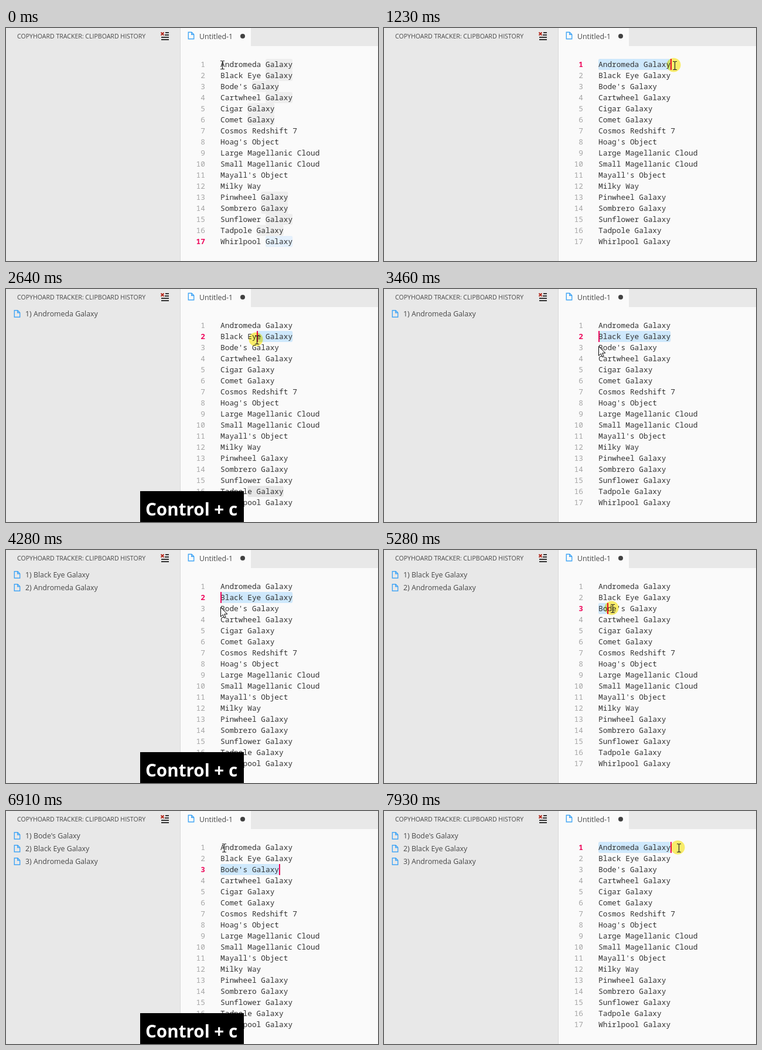
An HTML page with a canvas that plays this animation: 635x400 px, repeating every 8 s.

```html
<!DOCTYPE html>
<html lang="en">
<head>
<meta charset="utf-8">
<title>Clipboard history</title>
<style>
  html, body { margin: 0; width: 100%; height: 100%; overflow: hidden; background: #fafafa; }
  canvas { display: block; }
</style>
</head>
<body>
<canvas id="stage" width="635" height="400"></canvas>
<script>
const ctx = document.getElementById('stage').getContext('2d');

const LOOP = 8000, TICK = 203.3;
const TEXT_X = 366, CHAR = 7.7, TOP = 53, ROW = 19;
const SANS = '"Open Sans", "Noto Sans", sans-serif';
const MONO = '12.83px "Noto Sans Mono", monospace';
const PINK = '#ee0a5c', BLUE = '#42a5f5', SELECTED = '#cee8fc';

const lines = [
  'Andromeda Galaxy', 'Black Eye Galaxy', "Bode's Galaxy", 'Cartwheel Galaxy',
  'Cigar Galaxy', 'Comet Galaxy', 'Cosmos Redshift 7', "Hoag's Object",
  'Large Magellanic Cloud', 'Small Magellanic Cloud', "Mayall's Object", 'Milky Way',
  'Pinwheel Galaxy', 'Sombrero Galaxy', 'Sunflower Galaxy', 'Tadpole Galaxy', 'Whirlpool Galaxy'
];

// Each drag selects from its first column to the column reached at each tick.
const drags = [
  { start: 3, line: 0, columns: [0, 4, 11, 16] },
  { start: 11, line: 1, columns: [16, 13, 8, 4, 2, 0] },
  { start: 25, line: 2, columns: [0, 2, 6, 10, 13] },
  { start: 37, line: 0, columns: [0, 9, 16] }
];
const copies = [9, 18, 30];
const CAPTION_TICKS = 5;

// tick, x, y
const mousePath = [
  [0, 369, 63], [3, 369, 63], [4, 398, 63], [6, 496, 64], [9, 496, 64], [11, 491, 84],
  [12, 466, 85], [13, 428, 87], [14, 394, 91], [16, 366, 98], [24, 366, 98], [25, 368, 100],
  [26, 390, 100], [29, 474, 101], [30, 474, 101], [33, 372, 63], [36, 372, 63],
  [37, 368, 63], [39, 503, 63]
];

const fileIcon = new Path2D('M.8.8H6.4L10.2 4.6V12.2H.8ZM6.2 1V4.8H10');
const beam = new Path2D('M-3.5-7H-1.5Q0-7 0-5.5Q0-7 1.5-7H3.5M0-6V6M-3.5 7H-1.5Q0 7 0 5.5Q0 7 1.5 7H3.5');
const arrow = new Path2D('M.5.5V16.5L4.2 13L6.8 18.8L9.2 17.8L6.7 12H11.8Z');

function rect(x, y, w, h, color, radius = 0) {
  ctx.fillStyle = color;
  ctx.beginPath();
  ctx.roundRect(x, y, w, h, radius);
  ctx.fill();
}

function text(string, x, y, font, color, align = 'left') {
  ctx.font = font;
  ctx.fillStyle = color;
  ctx.textAlign = align;
  ctx.fillText(string, x, y);
}

function circle(x, y, r, color) {
  ctx.fillStyle = color;
  ctx.beginPath();
  ctx.arc(x, y, r, 0, 7);
  ctx.fill();
}

function shape(path, x, y, stroke, width, fill) {
  ctx.save();
  ctx.translate(x, y);
  ctx.strokeStyle = stroke;
  ctx.lineWidth = width;
  if (fill) { ctx.fillStyle = fill; ctx.fill(path); }
  ctx.stroke(path);
  ctx.restore();
}

function mouseAt(tick) {
  const next = mousePath.findIndex(p => p[0] >= tick);
  const [t1, x1, y1] = mousePath[next];
  const [t0, x0, y0] = mousePath[Math.max(0, next - 1)];
  const f = t1 > t0 ? (tick - t0) / (t1 - t0) : 1;
  return [Math.round(x0 + (x1 - x0) * f), Math.round(y0 + (y1 - y0) * f)];
}

function selectionAt(tick) {
  const drag = drags.findLast(d => d.start <= tick);
  if (!drag) return null;
  const { start, line, columns } = drag;
  const last = columns.length - 1;
  const head = columns[Math.min(tick - start, last)];
  const idle = Math.max(0, tick - start - last);
  return {
    line, head, from: Math.min(columns[0], head), to: Math.max(columns[0], head),
    pressed: tick <= start + last,
    caret: Math.floor(idle / 2.3) % 2 === 0
  };
}

function mark(line, from, to, color) {
  rect(TEXT_X + from * CHAR, TOP + line * ROW, (to - from) * CHAR, ROW, color, 3);
}

function markMatches(word, color) {
  lines.forEach((content, i) => {
    const at = content.toLowerCase().indexOf(word.toLowerCase());
    if (at >= 0) mark(i, at, at + word.length, color);
  });
}

function drawSidebar(tick) {
  rect(0, 0, 297, 400, '#e8e8e8');
  rect(297, 0, 1, 400, '#d9d9d9');
  text('COPYHOARD TRACKER: CLIPBOARD HISTORY', 19, 18, '10.57px ' + SANS, '#484848');

  rect(272, 7, 6, 2, '#333');
  rect(271, 11, 7, 2, '#333');
  rect(265, 15, 13, 2, '#333');
  rect(265, 19, 13, 2, '#333');
  shape(new Path2D('M0 0L5 5M5 0L0 5'), 264.5, 7.5, '#b3261a', 1.8);

  const count = copies.filter(t => t + 1 <= tick).length;
  for (let i = 0; i < count; i++) {
    const y = 36 + i * 22;
    shape(fileIcon, 13.5, y, BLUE, 1.4);
    text(`${i + 1}) ${lines[count - 1 - i]}`, 33, y + 11, '12.35px ' + SANS, '#484848');
  }
}

function drawEditor(selection) {
  rect(298, 0, 337, 400, '#fafafa');
  rect(418, 0, 217, 31, '#e8e8e8');
  shape(fileIcon, 310.5, 6.5, BLUE, 1.4);
  text('Untitled-1', 330, 19, '12.35px ' + SANS, '#484848');
  circle(404, 14, 4, '#424242');

  if (selection) {
    const { line, from, to } = selection;
    if (to - from > 1) markMatches(lines[line].slice(from, to), '#e6e6e6');
    if (to > from) mark(line, from, to, SELECTED);
  } else {
    markMatches('Galaxy', '#eeeeee');
    mark(16, 10, 16, '#e4f0fc');
  }

  const active = selection ? selection.line : 16;
  lines.forEach((content, i) => {
    const y = TOP + i * ROW + 14;
    text(i + 1, 340, y, (i === active ? '600 ' : '') + MONO, i === active ? PINK : '#a5a5a5', 'right');
    text(content, TEXT_X, y, MONO, '#333');
  });

  if (selection && selection.caret)
    rect(Math.round(TEXT_X + selection.head * CHAR), TOP + active * ROW, 2, ROW, PINK);
}

function drawCaption(tick) {
  if (!copies.some(t => tick >= t && tick < t + CAPTION_TICKS)) return;
  rect(229, 347, 177, 53, '#000');
  text('Control + c', 238, 389, 'bold 29.6px ' + SANS, '#fff');
}

function drawMouse(tick, pressed) {
  const [x, y] = mouseAt(tick);
  if (pressed) {
    ctx.globalCompositeOperation = 'multiply';
    circle(x - 1.5, y - 0.5, 12, '#fdf16c');
    ctx.globalCompositeOperation = 'source-over';
  }
  if (tick > 16 && tick < 25) shape(arrow, x, y, '#000', 1, '#fff');
  else shape(beam, x + 0.5, y + 0.5, '#222', 1.2);
}

function draw() {
  const tick = Math.floor((performance.now() % LOOP + 14) / TICK);
  const selection = selectionAt(tick);
  drawEditor(selection);
  drawSidebar(tick);
  drawCaption(tick);
  drawMouse(tick, selection && selection.pressed);
  requestAnimationFrame(draw);
}
draw();
</script>
</body>
</html>
```
